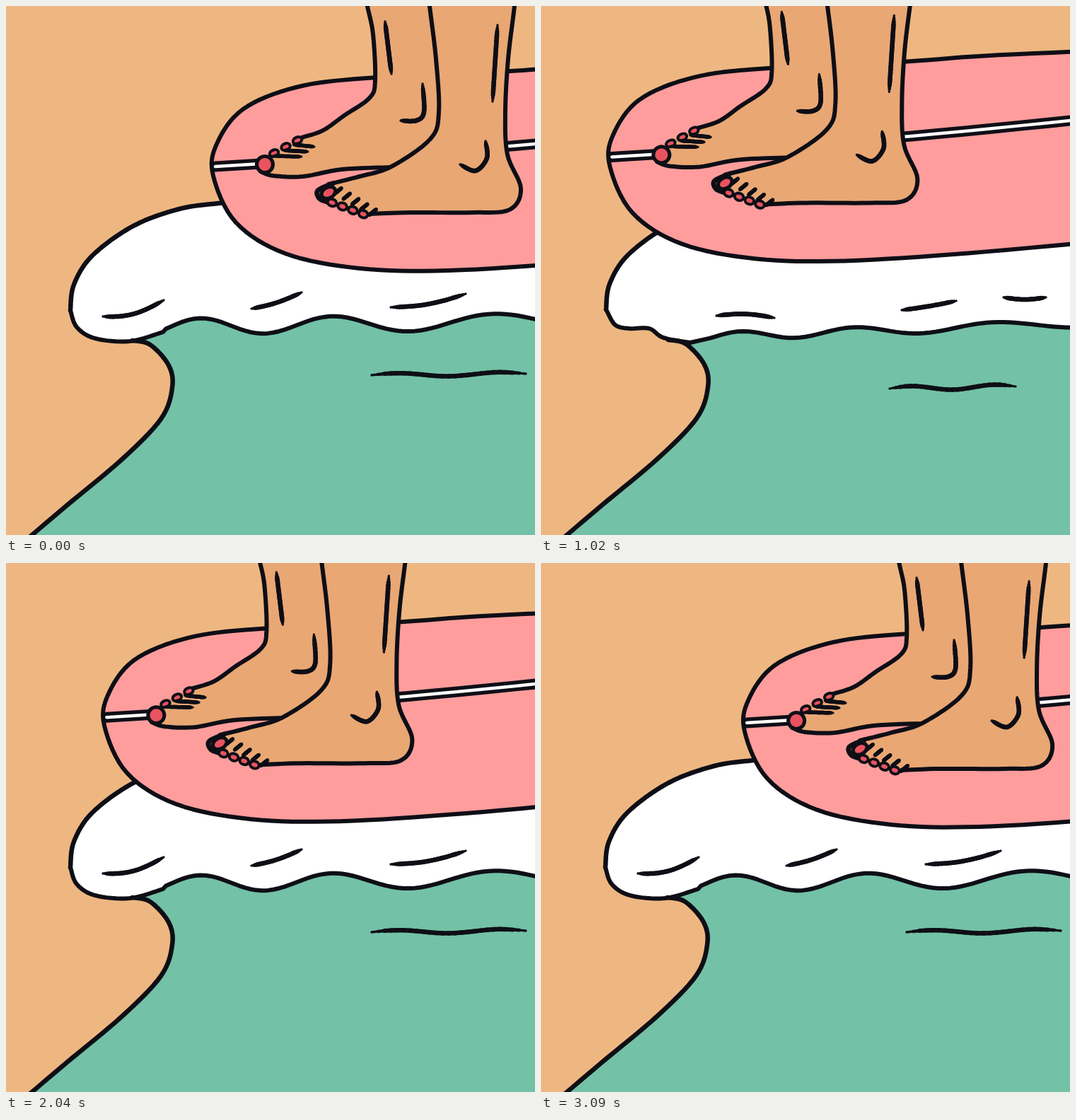
Write an HTML page with a canvas that moves like this. It is 748 by 748 pixels and loops after 3.12 s.

```html
<!DOCTYPE html>
<html lang="en">
<head>
<meta charset="utf-8">
<title>Surf feet</title>
<style>
html, body { margin: 0; width: 100%; height: 100%; overflow: hidden; background: #eeb781; }
canvas { display: block; width: 100vw; height: 100vh; }
</style>
</head>
<body>
<canvas id="stage" width="748" height="748"></canvas>
<script>
const ctx = document.getElementById('stage').getContext('2d');
const { PI, sin, cos, min, max, floor } = Math;
const SAND = '#eeb781', SKIN = '#e9a773', PINK = '#ff9d9d', SEA = '#73c1a7',
      INK = '#0e0e16', NAIL = '#e8535f';
const LOOP = 3120, STEP = 30, HOLD = 300, FAR_LEFT = 1170;

const range = (n, make) => Array.from({ length: n }, (_, i) => make(i));

// Catmull-Rom spline through "x,y x,y ...", sampled to points
function curve(text) {
  const p = text.split(' ').map(s => s.split(',').map(Number)), out = [];
  for (let i = 0; i < p.length - 1; i++) {
    const a = p[i - 1] || p[i], b = p[i], c = p[i + 1], d = p[i + 2] || c;
    for (let u = 0; u < 1; u += .125) {
      out.push([0, 1].map(j => b[j] + u / 2 * (c[j] - a[j] +
        u * (2 * a[j] - 5 * b[j] + 4 * c[j] - d[j] + u * (3 * (b[j] - c[j]) + d[j] - a[j])))));
    }
  }
  return [...out, p[p.length - 1]];
}

function trace(pts) {
  ctx.beginPath();
  pts.forEach(p => ctx.lineTo(p[0], p[1]));
}

function fill(color, ...parts) {
  trace(parts.flat());
  ctx.fillStyle = color;
  ctx.fill();
}

function line(pts, width = 6, color = INK) {
  trace(pts);
  ctx.lineWidth = width;
  ctx.strokeStyle = color;
  ctx.stroke();
}

// Brush mark that thins out at both ends
function mark(pts, width = 6.5) {
  const n = pts.length - 1;
  for (let i = 0; i < n; i++) {
    const u = (i + .5) / n;
    line([pts[i], pts[i + 1]], width * min(1, .4 + 5 * min(u, 1 - u)));
  }
}

// Stroke of w by h that bends sideways in a number of half waves
const dash = (x, y, w, h, bend = 0, halves = 1) => range(25, i => {
  const s = i / 24;
  return [x + w * s, y + h * s + bend * sin(halves * PI * s)];
});

// Wave foot that falls away to the right, its ripples growing longer
const ripples = (x0, y0, slope, height, rate, slowing, from) => range(75, i => {
  const x = from + 8 * i, u = x - x0;
  return [x, y0 - slope * u - height * cos(2 * PI * u * (rate - slowing * u))];
});

function nail(x, y, rx, ry, angle, outline = 4) {
  ctx.beginPath();
  ctx.ellipse(x, y, rx, ry, angle, 0, 7);
  ctx.lineWidth = outline * 2;
  ctx.strokeStyle = INK;
  ctx.stroke();
  ctx.fillStyle = NAIL;
  ctx.fill();
}

const shore = curve('179,473 204,479 230,508 235,540 219,584 164,641 85,707 18,764');
const crest = curve('340,276 300,279 245,287 180,311 122,353 96,394 91,430');

const waves = [
  {
    lift: [0, 0],
    edge: [...curve('91,430 100,454 126,470 175,474 222,461'),
      ...ripples(275, 453, .015, 11.5, .0058, 2.4e-6, 226)],
    marks: [dash(137, 439, 86, -23, 8), dash(347, 428, 71, -23, 3),
      dash(544, 426, 106, -19, 5), dash(517, 522, 218, -2, -2.5, 3)]
  },
  {
    lift: [-2, -4],
    edge: [...curve('90,428 102,448 122,453 150,453 170,466 208,473'),
      ...ripples(280, 463, .036, 6, .0068, 3.4e-6, 235)],
    marks: [dash(245, 435, 82, 3, -4), dash(507, 427, 77, -13, 1),
      dash(651, 409, 60, 0, 3), dash(490, 538, 178, -3, -3, 3)]
  }
];
// Where the second wave drawing sits each time it appears
const shifts = [[0, 0], [3, 3], [-9, 6], [-9, 0], [-2, 0]];

const board = curve('1000,76 823,84 713,92 510,102 410,115 335,146 298,195 293,240 325,306 395,350 500,371 625,374 800,363 1000,345');
const stripe = curve('296,227 500,214 720,197.5 1000,170');

const backShin = curve('504,-40 511,0 519,40 522,105 514,130 478,155 448,176 418,186');
const backSole = curve('360,234 378,240 420,241 475,231 545,228');
const divide = curve('595,-40 599,0 608,75 612,150 600,188 545,227 500,241 456,252');
const frontHeel = curve('722,-40 719,0 710,75 706,150 709,210 728,258 712,288 660,292 570,292 515,294');
const bigToe = curve('462,251 441,261 443,272 454,277');
const legMarks = [dash(536, 22, 9, 74), dash(695, 27, -7, 108),
  curve('589,110 591,150 580,162 558,162'), curve('678,191 680,215 664,233 642,224')];

function drawWave(time) {
  const beat = floor(time / HOLD), wave = waves[beat % 2];
  const lifted = pts => pts.map(([x, y]) => [x + wave.lift[0], y + wave.lift[1]]);
  const bank = lifted(shore), top = lifted(crest);
  ctx.save();
  if (beat % 2) ctx.translate(...shifts[beat >> 1]);
  fill(SEA, bank, [[18, 800], [780, 800], [780, 400], [300, 400]]);
  fill('#fff', top, wave.edge, [[780, 276]]);
  line(bank, 6.5);
  line(top, 6.5);
  line(wave.edge);
  wave.marks.forEach(m => mark(m));
  ctx.restore();
}

function drawBoard() {
  fill(PINK, board);
  line(board);
  line(stripe, 15);
  line(stripe, 4.5, '#fff');
}

function drawFeet() {
  fill(SKIN, backShin, [[385, 200], [358, 218]], backSole, divide.slice(0, 41).reverse());
  line(backShin);
  for (let i = 2; i >= 0; i--) nail(379 + 16.5 * i, 208 - 9 * i, 4.5, 2.5, -.4);
  line(backSole);
  nail(366, 224, 9, 9, -.5, 5);
  for (let i = 0; i < 3; i++) mark(dash(378 + 14 * i, 212 - 8 * i, 40 - 5 * i, 1 + i), 5.5);

  fill(SKIN, divide, bigToe, frontHeel.slice().reverse());
  line(divide);
  line(frontHeel);
  line(bigToe, 7);
  for (let i = 3; i >= 0; i--) nail(461 + 14.7 * i, 278 + 5.4 * i, 4.5, 3, .35);
  nail(456, 264, 8, 5, -.5, 5);
  for (let i = 0; i < 5; i++) mark(dash(464 + 12.3 * i, 266 + 7.5 * i, 11, -9), 5.5);
  legMarks.forEach(m => mark(m));
}

// Single hump between two times
const hump = (t, a, b) => sin(PI * min(1, max(0, (t - a) / (b - a))));

// Board slides out, slows down, speeds back, and rises once each way
function boardAt(t) {
  const reach = t < FAR_LEFT
    ? sin(PI / 2 * (t / FAR_LEFT) ** 1.16)
    : cos(PI / 2 * (t - FAR_LEFT) / (LOOP - FAR_LEFT));
  return [-201 * reach, -21.7 * hump(t, 0, 1300) - 15 * hump(t, 1770, LOOP)];
}

ctx.lineCap = ctx.lineJoin = 'round';
const start = performance.now();

function frame() {
  const time = floor((performance.now() - start) % LOOP / STEP) * STEP;
  ctx.fillStyle = SAND;
  ctx.fillRect(0, 0, 748, 748);
  drawWave(time);
  ctx.save();
  ctx.translate(...boardAt(time));
  drawBoard();
  drawFeet();
  ctx.restore();
  requestAnimationFrame(frame);
}
frame();
</script>
</body>
</html>
```
